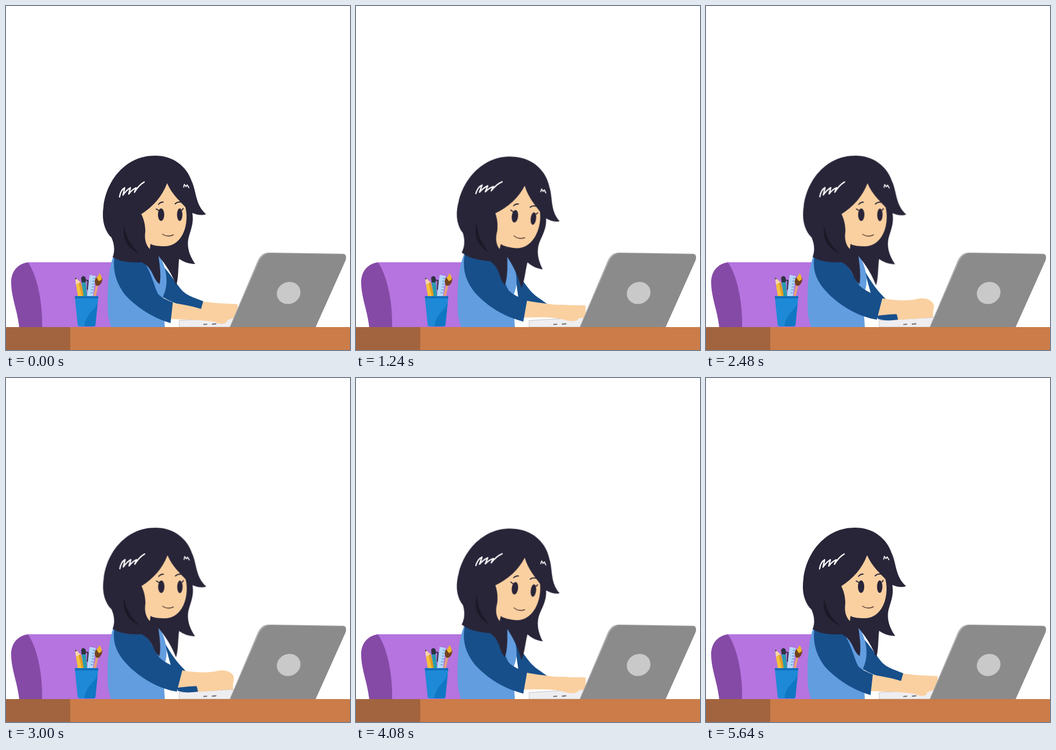
Recreate the animation shown at these times as an HTML page. Size 600 px wide and 600 px high, loop 5.68 s.

```html
<!DOCTYPE html>
<html lang="en">
<head>
<meta charset="utf-8">
<title>Typing at a desk</title>
<style>
  html, body { margin: 0; width: 100%; height: 100%; overflow: hidden; background: #fff; }
  svg { display: block; width: 100vw; height: 100vh; }
  .line { fill: none; stroke-linecap: round; stroke-linejoin: round; }
  .skin { fill: #fad0a0; }
  .sleeve { fill: #174f8b; }
  .hair { fill: #282539; }

  .head {
    transform-origin: 251px 420px;
    animation: nod 2840ms cubic-bezier(.37, 0, .63, 1) infinite;
  }
  @keyframes nod {
    0%, 1.4% { transform: rotate(0deg); }
    30.3%, 62.7% { transform: rotate(7deg); }
    91.5%, 100% { transform: rotate(0deg); }
  }

  /* The two arms alternate between a low and a high key press. */
  .arm { animation: 568ms ease-in-out infinite; }
  .far-hand { animation-name: far-hand; }
  .far-sleeve { animation-name: far-sleeve; }
  .near-hand { animation-name: near-hand; }
  .near-sleeve { animation-name: near-sleeve; }

  @keyframes far-hand {
    0%, 12%, 88%, 100% { d: path("M330 513 C350 517 375 519 404 520 L404 545 C380 545 355 540 330 528 Z"); }
    26%, 74% { d: path("M322 528 C345 528 370 526 396 525 L396 543 C375 545 355 546 326 548 Z"); }
  }
  @keyframes far-sleeve {
    0%, 12%, 88%, 100% { d: path("M276 456 C287 468 296 483 306 495 C316 506 330 509 344 515 L340 529 C318 526 295 521 274 508 Z"); }
    26%, 74% { d: path("M276 460 C284 475 292 487 303 500 C313 511 324 521 332 535 L335 547 C322 549 311 549 300 546 Z"); }
  }
  @keyframes near-hand {
    0%, 12%, 88%, 100% { d: path("M284 516 C302 520 325 523 342 529 C370 530 393 534 397 541 C398 547 385 545 385 551 C381 557 369 554 365 551 C340 547 315 547 284 546 Z"); }
    26%, 74% { d: path("M296 507 C316 513 345 515 364 512 C379 508 391 510 397 520 C399 529 395 537 390 541 C384 545 370 544 363 543 C345 535 325 537 293 541 Z"); }
  }
  @keyframes near-sleeve {
    0%, 12%, 88%, 100% { d: path("M190 432 C185 456 190 480 207 503 C225 523 253 543 287 553 L291 517 C281 513 271 509 265 502 C257 486 253 460 234 437 Z"); }
    26%, 74% { d: path("M190 432 C185 454 189 474 207 495 C229 520 262 541 298 547 L308 508 C291 503 278 497 268 488 C259 477 252 456 234 437 Z"); }
  }
</style>
</head>
<body>
<svg viewBox="0 0 600 600">
  <g id="chair">
    <path fill="#b574df" d="M38 447 H195 V560 H60 Z"/>
    <path fill="#854aa6" d="M38 447 C54 468 64 516 63 560 H23 C20 531 9 508 9 482 C9 463 20 450 38 447 Z"/>
  </g>

  <g id="laptop-base">
    <path fill="#eeeef1" stroke="#c6c6cb" stroke-width="1" d="M302 548.5 L400 543 V560 H302 Z"/>
    <path class="line" stroke="#77777c" stroke-width="2.2" d="M345 555.5 L350 555 M360 554.8 L366 554.3"/>
  </g>

  <path class="arm skin far-hand" d="M330 513 C350 517 375 519 404 520 L404 545 C380 545 355 540 330 528 Z"/>
  <path class="arm sleeve far-sleeve" d="M276 456 C287 468 296 483 306 495 C316 506 330 509 344 515 L340 529 C318 526 295 521 274 508 Z"/>
  <path fill="#629de0" d="M188 434 C177 462 176 505 178 540 L183 560 H277 L275 528 L274 506 C283 488 283 460 266 433 L205 425 Z"/>
  <path class="arm skin near-hand" d="M284 516 C302 520 325 523 342 529 C370 530 393 534 397 541 C398 547 385 545 385 551 C381 557 369 554 365 551 C340 547 315 547 284 546 Z"/>
  <path class="arm sleeve near-sleeve" d="M190 432 C185 456 190 480 207 503 C225 523 253 543 287 553 L291 517 C281 513 271 509 265 502 C257 486 253 460 234 437 Z"/>

  <g class="head">
    <path class="hair" d="M260 261 C291 261 315 279 324 306 C332 322 330 347 349 363 C341 366 332 364 325 361 C328 379 322 390 318 406 C315 424 322 438 330 450 C319 450 309 446 302 441 C300 457 301 474 297 487 C291 473 285 459 266 436 C268 452 271 469 268 485 C255 476 258 458 237 447 C217 448 198 446 186 438 C191 425 188 413 184 404 C170 390 167 370 170 350 C175 305 208 261 260 261 Z"/>
    <path class="skin" d="M281 309 C289 328 304 341 313 351 C317 367 315 388 306 402 C298 414 288 419 277 419 C266 419 257 418 252 415 L251 424 C244 417 241 407 243 393 C243 381 240 371 236 363 C256 350 272 333 281 309 Z"/>
    <path fill="#1b1926" d="M206 384 C202 405 212 424 234 432 C219 420 210 405 206 384 Z"/>
    <g fill="#292438">
      <ellipse cx="270.5" cy="364" rx="5.5" ry="11"/>
      <ellipse cx="303" cy="364" rx="4.7" ry="11"/>
    </g>
    <path class="line" stroke="#292438" stroke-width="1.8" d="M262 354 L267 357 M307 356 L309 353 M266 346 Q269 342 274 342 M295 345 Q299 341 304 342"/>
    <path class="line" stroke="#51352f" stroke-width="1.4" d="M273 398 Q282 404 292 399"/>
    <path class="line" stroke="#fff" stroke-width="2.2" d="M198 333 Q200 321 207 317 L204 330 Q210 321 217 317 L214 328 Q220 320 227 317 L224 325 Q232 312 241 307"/>
    <path class="line" stroke="#fff" stroke-width="1.6" d="M310 316 L311 311 L314 315 L316 312 L319 317"/>
  </g>

  <g id="laptop-lid">
    <path fill="#b0b0b0" d="M390 560 L437 449 C442 436 448 430 459 430 L588 432 C594 433 594 438 592 444 L540 560 Z"/>
    <path fill="#8b8b8b" d="M391 560 L440 448 C445 437 451 431 462 431 L588 433 C593 433 594 438 592 444 L540 560 Z"/>
    <ellipse cx="493" cy="500.5" rx="21" ry="19" fill="#c9c9c9" transform="rotate(-25 493 500.5)"/>
  </g>

  <g id="pencils">
    <path fill="#f4c23c" d="M122 486 L130 482 L138 510 H126 Z"/>
    <path fill="#e19a25" d="M127 484 L130 482 L138 510 H133 Z"/>
    <path fill="#f5d7a6" d="M120.5 473 L122 486 L130 482 Z"/>
    <path fill="#333" d="M120.5 473 L121 477 L123.5 476 Z"/>
    <path fill="#2d3240" d="M131 474 Q135 468 139 474 V483 H132 Z"/>
    <path fill="#279cab" d="M132 482 H139 L142 510 H136 Z"/>
    <path class="line" stroke="#2d3240" stroke-width="2" d="M139 478 L143 479 L142 494"/>
    <path fill="#b4d7fa" d="M146 469 L156.5 471 L151 510 H141 Z"/>
    <path class="line" stroke="#4776b4" stroke-width="1" d="M152 475 h3 M151 480 h3 M150.5 485 h3 M150 490 h3 M149 495 h3 M148 500 h3"/>
    <path class="line" stroke="#e6a376" stroke-width="4" d="M159 487 L154 509"/>
    <path fill="#70421f" d="M157 474 Q163 470 168 475 C168 482 164 489 158 488 C154 484 154 478 157 474 Z"/>
    <path fill="#efb52f" d="M158 474 Q161 471 163 466 Q167 471 167 477 L162 480 Z"/>
  </g>
  <g id="cup">
    <path fill="#1e89d6" d="M120 507 H161 L156 556 Q156 559 151 559 H130 Q125 559 125 556 Z"/>
    <path fill="#1077c4" d="M160 516 C157 531 139 535 137 559 H151 Q156 559 156 556 Z"/>
    <path fill="#116fbd" d="M120 506 H161 L160.5 510 H120.5 Z"/>
  </g>

  <g id="table">
    <path fill="#cb7c49" d="M0 560 H600 V600 H0 Z"/>
    <path fill="#a2643f" d="M0 560 H112 V600 H0 Z"/>
  </g>
</svg>
</body>
</html>
```
